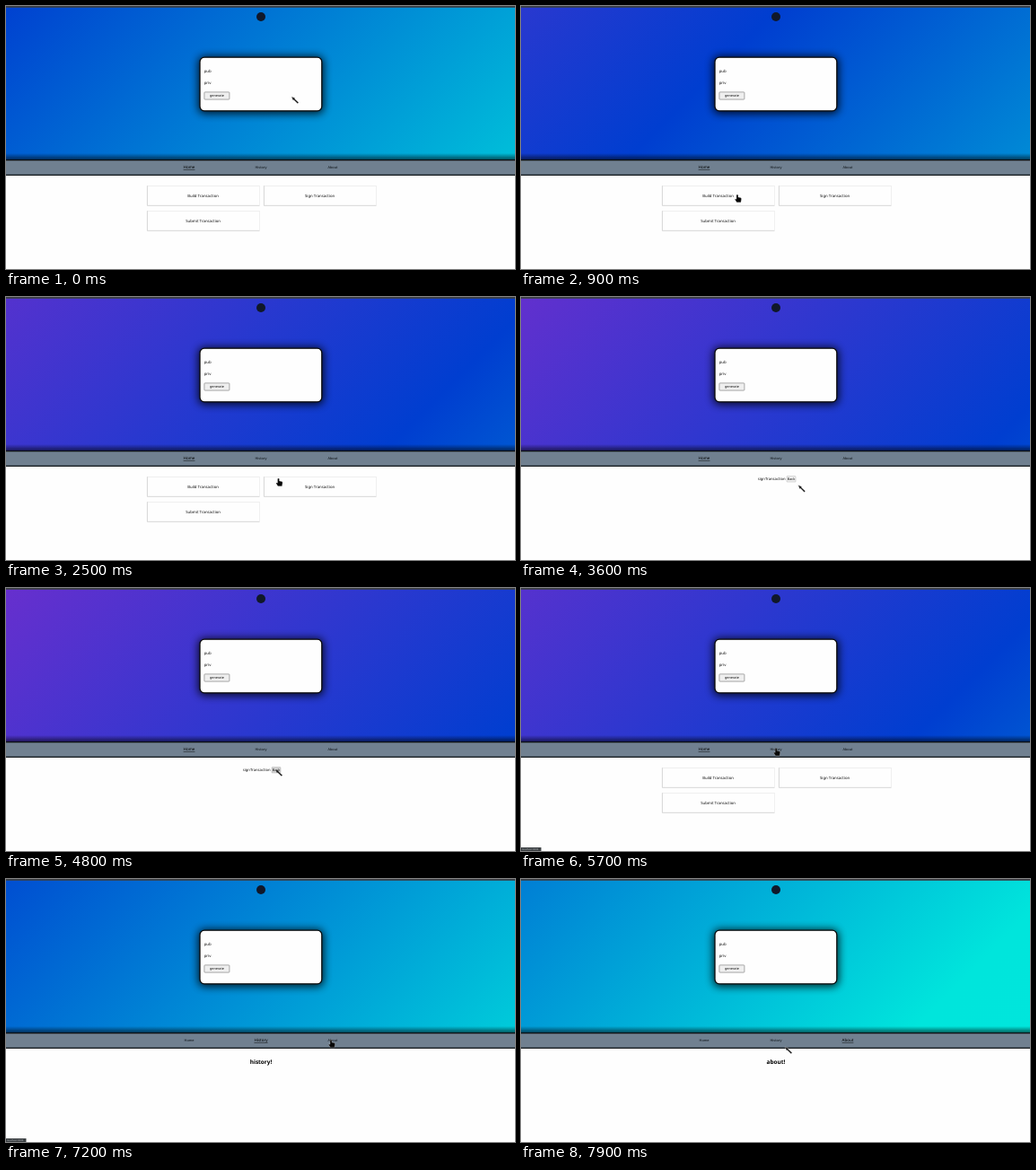
Write an HTML page that moves like this. It is 567x293 px and loops after 8 s.

```html
<!DOCTYPE html>
<html lang="en">
<head>
<meta charset="utf-8">
<title>Transaction wallet demo</title>
<style>
html, body { margin: 0; width: 100%; height: 100%; overflow: hidden; background: #fefefe; }
svg { display: block; width: 100vw; height: 100vh; }
text { font-family: "Noto Sans", "Open Sans", sans-serif; font-size: 4.3px; fill: #111; text-rendering: geometricPrecision; }
.mid { text-anchor: middle; }
.nav { font-size: 3.85px; fill: #0b0f14; }
.nav.on { font-size: 4.5px; fill: #000; text-decoration: underline; }
.title { font-size: 6.45px; font-weight: 700; fill: #000; }
.small { font-size: 3.75px; }
</style>
</head>
<body>
<svg id="stage" viewBox="0 0 567 293" preserveAspectRatio="none">
  <defs>
    <linearGradient id="sky" gradientUnits="userSpaceOnUse">
      <stop offset="0" stop-color="#8b2acd"/>
      <stop offset=".333" stop-color="#003ed0"/>
      <stop offset=".667" stop-color="#00e5dc"/>
      <stop offset="1" stop-color="#00e8dc"/>
    </linearGradient>
    <linearGradient id="edge" x2="0" y2="1">
      <stop offset="0" stop-color="#000" stop-opacity="0"/>
      <stop offset="1" stop-color="#000" stop-opacity=".6"/>
    </linearGradient>
    <filter id="blur" x="-30%" y="-50%" width="160%" height="200%">
      <feGaussianBlur stdDeviation="5"/>
    </filter>
  </defs>

  <rect width="567" height="293" fill="#fefefe"/>
  <rect y="1" width="567" height="171" fill="url(#sky)"/>
  <rect width="567" height="1.8" fill="#3b3f45"/>
  <rect y="164" width="567" height="7.5" fill="url(#edge)"/>
  <circle cx="284" cy="12" r="5" fill="#10182a"/>

  <rect x="214" y="56" width="140" height="64" rx="7" opacity=".8" filter="url(#blur)"/>
  <rect x="216" y="57.2" width="135.8" height="59.6" rx="5" fill="#fefefe" stroke="#0a0a0a" stroke-width="1.3"/>
  <text x="220.7" y="73.8">pub</text>
  <text x="220.7" y="86.8">priv</text>
  <rect x="220.9" y="95.9" width="28" height="8.2" rx=".8" fill="#efefef" stroke="#858585" stroke-width=".7"/>
  <text class="mid small" x="235" y="101.2">generate</text>

  <rect y="171" width="567" height="18" fill="#708090"/>
  <rect y="171" width="567" height="1.3" fill="#0c0f12"/>
  <rect y="187.7" width="567" height="1.2" fill="#0c0f12"/>
  <g id="nav"></g>

  <g id="home"></g>
  <g id="detail">
    <text id="label" x="294.7" y="204.2" text-anchor="end" style="font-size:4.2px"></text>
    <rect id="back" x="296" y="199.6" width="10" height="6.4" rx=".6" stroke="#a5a5a5" stroke-width=".4"/>
    <text class="mid small" x="301" y="204">Back</text>
  </g>
  <text id="title" class="mid title" x="284" y="206"></text>

  <g id="status">
    <rect y="289" width="22.5" height="4" fill="#3c4043"/>
    <text x="1" y="292.1" style="font-size:2.7px;fill:#b5b9bd">localhost:3000</text>
  </g>

  <path id="arrow" d="M0 0 L3.9 1.6 L3.7 2.6 L8 6.6 L6.8 7.8 L2.7 3.7 L1.7 4.1 Z" fill="#1c1c1c" stroke="#eee" stroke-width=".3"/>
  <path id="hand" d="M-1 .8 Q0 -.6 1 .8 V3 L3.6 3.5 Q4.7 3.8 4.6 5 L4 8.8 H-.6 L-2.7 5.6 Q-2.7 4.4 -1 5.2 Z" fill="#080808" stroke="#eee" stroke-width=".25"/>
</svg>

<script>
const LOOP = 8000, STEP = 100;
const el = id => document.getElementById(id);

function add(parent, tag, attrs, text = "") {
  const node = document.createElementNS("http://www.w3.org/2000/svg", tag);
  for (const key in attrs) node.setAttribute(key, attrs[key]);
  node.textContent = text;
  return parent.appendChild(node);
}

const tabs = ["Home", "History", "About"].map((name, i) =>
  add(el("nav"), "text", { class: "mid nav", x: 204 + i * 80, y: 181.4 }, name));

function tile(x, y, name) {
  add(el("home"), "rect", { x, y, width: 125, height: 22, fill: "#fefefe", stroke: "#e6e6e6", "stroke-width": .6 });
  add(el("home"), "path", { d: `M${x} ${y}v22h125`, fill: "none", stroke: "#cfcfcf", "stroke-width": .7 });
  add(el("home"), "text", { class: "mid", x: x + 62.2, y: y + 12.7 }, name);
}
tile(157.4, 200.3, "Build Transaction");
tile(287.4, 200.3, "Sign Transaction");
tile(157.4, 228.3, "Submit Transaction");

// start time, page
const pages = [
  [0, "home"], [1300, "build"], [2000, "home"], [2900, "sign"],
  [5000, "home"], [5800, "history"], [7500, "about"]
];

// time, x, y of the pointer tip
const path = [
  [0, 318, 101], [200, 312, 112], [800, 241, 210], [1300, 240.5, 210],
  [1800, 300, 202], [2100, 300, 202], [2500, 303.5, 202], [3000, 304, 203],
  [3700, 309, 210], [4200, 308, 210], [4700, 300, 202], [5100, 300, 202],
  [5600, 284, 178], [6000, 285, 179], [6400, 325.5, 183.5], [6700, 345, 186],
  [7000, 361, 179], [7200, 362, 179], [7500, 362, 179], [7900, 294, 187], [8000, 294, 187]
];

function pointer(t) {
  const i = Math.max(1, path.findIndex(p => p[0] > t));
  const [a, b] = [path[i - 1], path[i]];
  const u = (t - a[0]) / (b[0] - a[0]), k = u * u * (3 - 2 * u);
  return [a[1] + (b[1] - a[1]) * k, a[2] + (b[2] - a[2]) * k];
}

// cubic-bezier(.25, .1, .25, 1)
function ease(x) {
  const bez = (s, p, q) => 3 * s * (1 - s) * (1 - s) * p + 3 * s * s * (1 - s) * q + s ** 3;
  let lo = 0, hi = 1;
  for (let i = 0; i < 24; i++) {
    const mid = (lo + hi) / 2;
    if (bez(mid, .25, .25) < x) lo = mid; else hi = mid;
  }
  return bez(lo, .1, 1);
}

// Oversized diagonal gradient that sways from one end to the other
function paintSky(t) {
  const half = 7500, turn = 5060, length = 2948;
  const k = t < turn ? 1 - ease((t - turn + half) / half) : ease((t - turn) / half);
  const x = -1701 * k, y = -254;
  const ends = { x1: x, y1: y, x2: x + length / 2, y2: y + length / 2 };
  for (const key in ends) el("sky").setAttribute(key, ends[key]);
}

const show = (id, on) => el(id).setAttribute("visibility", on ? "visible" : "hidden");
const inside = (x, y, l, t, r, b) => x >= l && x <= r && y >= t && y <= b;

function draw(t) {
  paintSky(t);
  const page = pages.filter(p => p[0] <= t).pop()[1];
  const [x, y] = pointer(t);
  const detail = page === "build" || page === "sign";
  const active = ["history", "about"].indexOf(page) + 1;

  tabs.forEach((tab, i) => tab.classList.toggle("on", i === active));
  show("home", page === "home");
  show("detail", detail);
  el("label").textContent = page + "Transaction";
  el("back").setAttribute("fill", inside(x, y, 296, 199, 306, 206) ? "#d2d2d2" : "#efefef");
  el("title").textContent = active ? page + "!" : "";

  const onTab = [204, 284, 364].some(c => inside(x, y, c - 7, 176, c + 7, 183));
  const onTile = page === "home" && (
    inside(x, y, 157, 200, 283, 222) || inside(x, y, 287, 200, 412, 222) || inside(x, y, 157, 228, 283, 250));
  const hand = onTab || onTile;
  show("status", onTab);
  show("hand", hand);
  show("arrow", !hand);
  for (const id of ["hand", "arrow"]) el(id).setAttribute("transform", `translate(${x} ${y})`);
}

const start = performance.now();
function tick() {
  const t = (performance.now() - start) % LOOP;
  draw(Math.floor(t / STEP) * STEP);
  requestAnimationFrame(tick);
}
tick();
</script>
</body>
</html>
```
